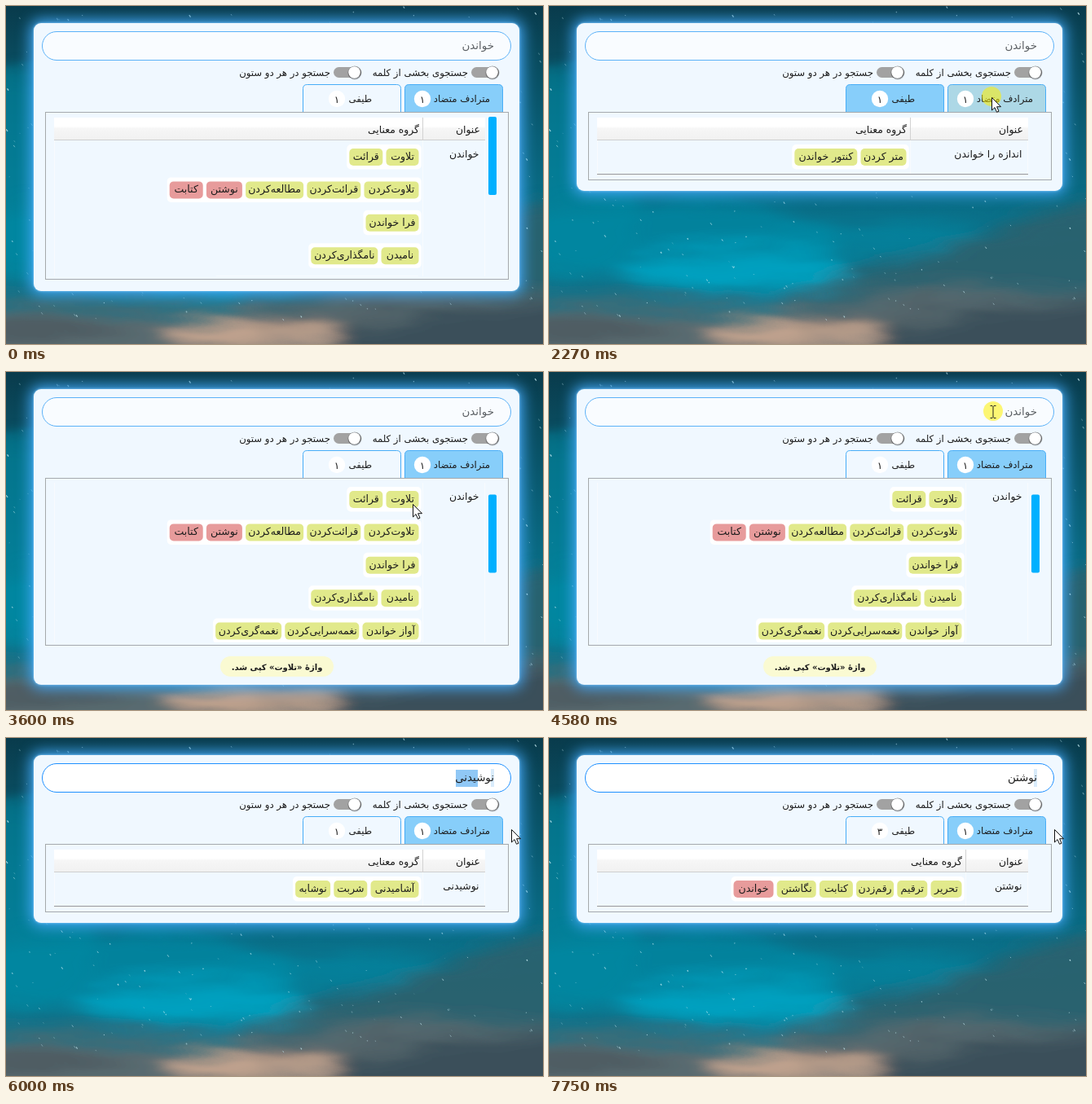
An HTML page for the animation above (8000 ms loop, 659 by 415 pixels).

```html
<!DOCTYPE html>
<html lang="fa">
<head>
<meta charset="utf-8">
<style>
html, body { margin: 0; width: 100%; height: 100%; overflow: hidden; }
#stage { position: relative; width: 659px; height: 415px; overflow: hidden; background: #0b667e; }
#panel {
  position: absolute; left: 34px; top: 21px; width: 596px; border-radius: 9px; background: aliceblue;
  box-shadow: 0 0 3px #8fd2ff, 0 0 17px 4px #45a9f8;
}
svg { position: absolute; left: 0; top: 0; }
text { font-family: 'DejaVu Sans', sans-serif; direction: rtl; fill: #1c1c1c; }
</style>
</head>
<body>
<div id="stage">
  <svg width="659" height="415">
    <defs>
      <linearGradient id="night" x2="0" y2="1">
        <stop offset="0" stop-color="#093b4c"/><stop offset=".14" stop-color="#0a4a5d"/>
        <stop offset=".4" stop-color="#0a6078"/><stop offset=".62" stop-color="#0a7089"/>
        <stop offset="1" stop-color="#157389"/>
      </linearGradient>
      <filter id="cloudy" filterUnits="userSpaceOnUse" x="-60" y="-60" width="780" height="540">
        <feGaussianBlur stdDeviation="11" result="soft"/>
        <feTurbulence type="fractalNoise" baseFrequency=".007 .03" numOctaves="3" seed="4"/>
        <feDisplacementMap in="soft" scale="34" xChannelSelector="R" yChannelSelector="G"/>
      </filter>
    </defs>
    <rect width="659" height="415" fill="url(#night)"/>
    <g filter="url(#cloudy)">
      <ellipse cx="0" cy="210" rx="120" ry="130" fill="#0a8aa3" opacity=".6"/>
      <ellipse cx="150" cy="285" rx="210" ry="50" fill="#0788a3" opacity=".75"/>
      <ellipse cx="400" cy="285" rx="130" ry="22" fill="#078ba6" opacity=".6"/>
      <ellipse cx="230" cy="325" rx="150" ry="26" fill="#06a0bf"/>
      <path d="M720 240L560 268 470 305 360 332 280 362 300 480H720Z" fill="#31606c" opacity=".85"/>
      <path d="M-60 372Q100 366 210 372T400 350L720 352V480H-60Z" fill="#586a70"/>
      <path d="M400 392L720 352V480H400Z" fill="#3b505a"/>
      <ellipse cx="40" cy="398" rx="110" ry="9" fill="#465159"/>
      <ellipse cx="300" cy="404" rx="115" ry="19" fill="#c3a48f"/>
      <path d="M310 396Q400 388 480 362" stroke="#4c585d" stroke-width="8" fill="none"/>
    </g>
  </svg>
  <svg id="stars" width="659" height="415"></svg>
  <div id="panel"></div>
  <svg id="view" width="659" height="415"></svg>
  <svg id="pointer" width="659" height="415">
    <defs><clipPath id="body"><rect x="49" y="136" width="567" height="196"/></clipPath>
      <linearGradient id="head" x2="0" y2="1">
        <stop offset="0" stop-color="#fff"/><stop offset=".4" stop-color="#fff"/>
        <stop offset=".5" stop-color="#f6f6f6"/><stop offset="1" stop-color="#f1f1f1"/>
      </linearGradient></defs>
    <g id="cursor">
      <circle id="click" cx="0" cy="-1" r="12" fill="#fff000" opacity=".55"/>
      <path id="arrow" d="M.5 .5V16L4 12.6 6.5 18.3 9 17.2 6.6 11.7H11.5Z" fill="#fff" stroke="#111"/>
      <path id="beam" d="M-3.5 -7.5H-1L0 -6.5 1 -7.5H3.5M0 -6.5V6.5M-3.5 7.5H-1L0 6.5 1 7.5H3.5" fill="none" stroke="#222"/>
    </g>
  </svg>
</div>
<script>
const LOOP = 8000;
const $ = id => document.getElementById(id);

const rect = (x, y, w, h, fill, r = 0, extra = '') =>
  `<rect x="${x}" y="${y}" width="${w}" height="${h}" rx="${r}" fill="${fill}" ${extra}/>`;
const text = (s, x, y, size, extra = '') =>
  `<text x="${x}" y="${y}" font-size="${size}" ${extra}>${s.replace(/_/g, '\u200c')}</text>`;
const line = (d, color) => `<path d="${d}" stroke="${color}" fill="none"/>`;
const MIDDLE = 'text-anchor="middle"';

// Chips are [word, width]; a leading "!" marks an antonym.
const PAGES = {
  read: { title: 'خواندن', split: 511, tall: true, counts: '۱۱', rows: [
    [['تلاوت', 40], ['قرائت', 41]],
    [['تلاوت_کردن', 67], ['قرائت_کردن', 66], ['مطالعه_کردن', 71], ['!نوشتن', 44], ['!کتابت', 41]],
    [['فرا خواندن', 65]],
    [['نامیدن', 46], ['نامگذاری_کردن', 82]],
    [['آواز خواندن', 69], ['نغمه_سرایی_کردن', 91], ['نغمه_گری_کردن', 81]]] },
  meter: { title: 'اندازه را خواندن', split: 443, counts: '۱۱', rows: [
    [['متر کردن', 56], ['کنتور خواندن', 77]]] },
  drink: { title: 'نوشیدنی', split: 511, counts: '۱۱', rows: [
    [['آشامیدنی', 59], ['شربت', 41], ['نوشابه', 43]]] },
  write: { title: 'نوشتن', split: 511, counts: '۱۳', rows: [
    [['تحریر', 38], ['ترقیم', 37], ['رقم_زدن', 46], ['کتابت', 41], ['نگاشتن', 48], ['!خواندن', 49]]] }
};

// Each step changes only the listed properties.
const STEPS = [
  [0, { page: 'read', tab: 0, hover: -1, scroll: 0, toast: false, focus: false, query: 'خواندن', select: null, caret: 0 }],
  [1110, { hover: 1 }],
  [1630, { page: 'meter', tab: 1, hover: -1 }],
  [1950, { hover: 0 }],
  [2390, { page: 'read', tab: 0, hover: -1 }],
  [2930, { scroll: 29 }],
  [3280, { toast: true }],
  [4690, { focus: true, select: [559, 599] }],
  [5450, { toast: false }],
  [5670, { query: 'ن', select: null, caret: 588 }],
  [5780, { query: 'نو', caret: 587 }],
  [5890, { query: 'نوشیدنی', select: [552, 579], caret: 0, page: 'drink', scroll: 0 }],
  [6110, { query: 'نوشتن', select: [563, 574] }],
  [6230, { page: 'write', select: null, caret: 563 }],
  [6770, { caret: 0 }],
  [7200, { caret: 563 }],
  [7750, { caret: 0 }]
];

// Pointer moves: start, end, number of jumps, destination.
const MOVES = [
  [520, 1210, 6, 452, 122],
  [1740, 2050, 3, 543, 112],
  [2500, 3040, 5, 499, 162],
  [3500, 3920, 4, 510, 146],
  [4030, 4350, 3, 545, 49],
  [4690, 4800, 1, 636, 44],
  [4920, 5020, 1, 620, 112]
];
const CLICKS = [[1520, 1630], [2270, 2390], [3160, 3280], [4580, 4690]];

function chipRow(row, right, y) {
  let x = right, chips = '';
  for (const [word, w] of row) {
    x -= w;
    chips += rect(x, y, w, 21, word[0] === '!' ? '#e79b9b' : '#e1e98b', 5)
      + text(word.replace('!', ''), x + w / 2, y + 14, 12.5, MIDDLE);
    x -= 4.2;
  }
  return rect(x + 1.2, y - 5, right - x + 2, 30.5, '#fff', 5) + chips;
}

function table({ title, split, tall, rows }, scroll) {
  const right = split - 4.5;
  const bottom = tall ? 380 : 206;
  const content = rect(59, 137, 529, 27, 'url(#head)')
    + line('M59 164.5H588', '#cfcfcf')
    + line(`M${split + .5} 137V164`, '#d2d2d2')
    + line(`M${split + .5} 165V${bottom}M59.5 165V${bottom}M587.5 165V${bottom}`, '#f8fbfe')
    + text('عنوان', 582, 155.5, 12.4) + text('گروه معنایی', split - 4, 155.5, 12.4)
    + text(title, 580.5, 186, 12.4)
    + rows.map((row, i) => chipRow(row, right, 175 + i * 40.4)).join('')
    + (tall ? '' : line('M59 206.5H588', '#999'));
  return `<g clip-path="url(#body)"><g transform="translate(0 ${-scroll})">${content}</g></g>`
    + (tall ? rect(592, 136 + scroll / 2, 10, 96, '#00b0ff', 2) : '');
}

function tab(s, i, label, x, labelX, badgeX) {
  const fill = s.hover === i ? '#add8e6' : s.tab === i ? '#87cefa' : '#f0f8ff';
  return `<path d="M${x} 130V101.5q0-5 5-5h110q5 0 5 5V130" fill="${fill}" stroke="#48adf7"/>`
    + text(label, labelX, 117.5, 11.7)
    + `<circle cx="${badgeX}" cy="114" r="10.2" fill="#fff"/>`
    + text(PAGES[s.page].counts[i], badgeX, 118.5, 12, MIDDLE);
}

const toggle = (x, label) =>
  rect(x, 75, 34, 13, '#a2a2a2', 6.5)
  + `<circle cx="${x + 26}" cy="82" r="8.6" fill="#0003"/>`
  + `<circle cx="${x + 25.8}" cy="81.8" r="8" fill="#0005"/>`
  + `<circle cx="${x + 25.5}" cy="81.5" r="7.3" fill="#fff"/>`
  + text(label, x - 4, 86, 11.7);

function search({ focus, query, select, caret }) {
  return rect(44.5, 31.5, 575, 35, focus ? '#fff' : '#f9fcff', 17.5, `stroke="${focus ? '#1e90ff' : '#5cb2f8'}"`)
    + (focus ? rect(595, 38, 4, 22, '#d9ecfb') : '')
    + (select ? rect(select[0], 39, select[1] - select[0], 21, '#90c8f6') : '')
    + text(query, 599, 53, 13.4, `style="fill:${focus ? '#1c1c1c' : '#5c6064'}"`)
    + (caret ? rect(caret, 38, 1, 22, '#111') : '');
}

function draw(s) {
  const page = PAGES[s.page];
  $('panel').style.height = (page.tall ? s.toast ? 363 : 329 : 206) + 'px';
  $('view').innerHTML = search(s)
    + toggle(571, 'جستجوی بخشی از کلمه') + toggle(402, 'جستجو در هر دو ستون')
    + tab(s, 0, 'مترادف متضاد', 489.5, 594, 511) + tab(s, 1, 'طیفی', 364.5, 449, 406)
    + rect(48.5, 130.5, 568, page.tall ? 205 : 83, 'none', 0, 'stroke="#a5a9ac"')
    + table(page, s.scroll)
    + (s.toast ? rect(263, 349, 139, 25, '#fafad2', 12.5)
      + text('واژهٔ «تلاوت» کپی شد.', 332.5, 365.5, 10, MIDDLE + ' font-weight="bold"') : '');
}

function pointerAt(t) {
  let x = 496, y = 322;
  for (const [start, end, jumps, toX, toY] of MOVES) {
    if (t < start) break;
    const p = Math.min(1, Math.floor((t - start) / (end - start) * jumps + 1e-6) / jumps);
    const ease = p * p * (3 - 2 * p);
    x += (toX - x) * ease;
    y += (toY - y) * ease;
  }
  return [x, y];
}

function scatterStars() {
  let seed = 41, out = '';
  const random = () => (seed = seed * 16807 % 2147483647) / 2147483647;
  for (let i = 0; i < 260; i++) {
    const x = random() * 659, y = random() * 385, len = .7 + random() * 2;
    out += `<path d="M${x} ${y}l${len * .7} ${len}" stroke="#c9eef5" stroke-width="${.6 + random() * .7}" opacity="${.25 + random() * .65}"/>`;
  }
  $('stars').innerHTML = out;
}

const show = (id, on) => $(id).setAttribute('visibility', on ? 'visible' : 'hidden');
const origin = performance.now();
let current = -1;

function frame() {
  const t = (performance.now() - origin) % LOOP;
  const index = STEPS.filter(([at]) => at <= t).length - 1;
  if (index !== current) {
    current = index;
    draw(Object.assign({}, ...STEPS.slice(0, index + 1).map(step => step[1])));
  }
  const beam = t >= 4240 && t < 4800;
  $('cursor').setAttribute('transform', `translate(${pointerAt(t)})`);
  show('arrow', t >= 520 && !beam);
  show('beam', beam);
  show('click', CLICKS.some(([a, b]) => t >= a && t < b));
  requestAnimationFrame(frame);
}

scatterStars();
frame();
</script>
</body>
</html>
```
